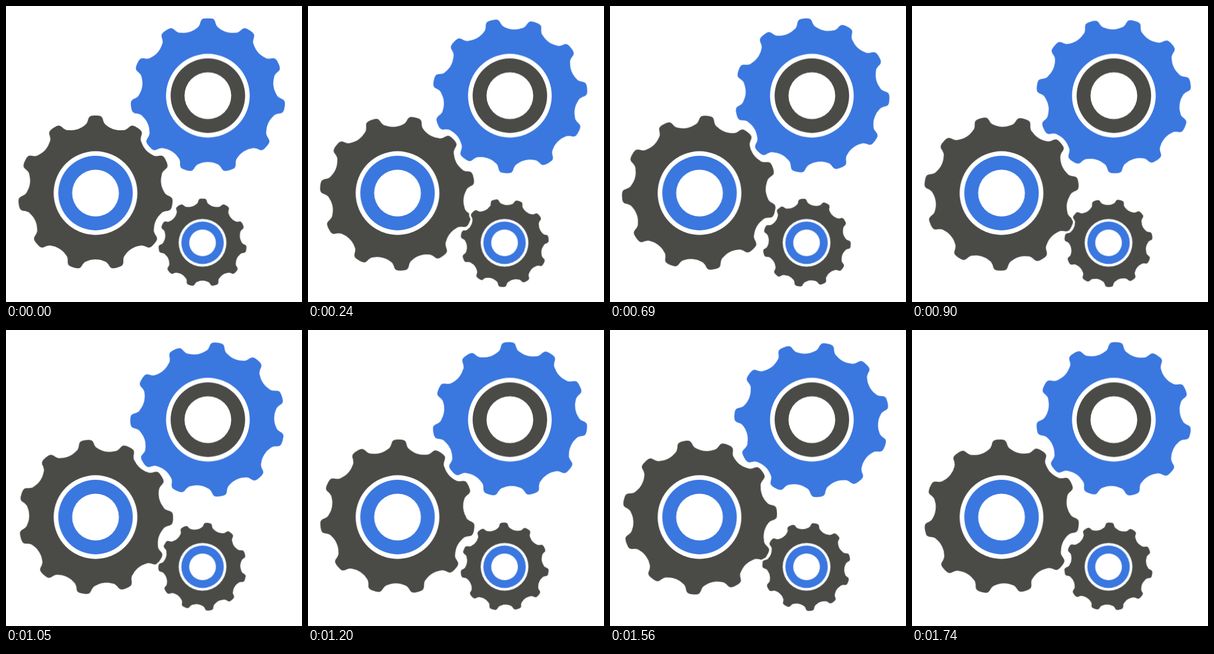
An HTML page that plays this animation: 500x500 px, repeating every 1770 ms.

```html
<!DOCTYPE html>
<html lang="en">
<head>
<meta charset="utf-8">
<title>Turning gears</title>
<style>
  html, body { margin: 0; width: 100%; height: 100%; overflow: hidden; background: #fff; }
  svg { display: block; width: 100vw; height: 100vh; }
  .blue { fill: #3a77df; }
  .dark { fill: #4a4a47; }
  .white { fill: #fff; }
  .wheel { animation: turn 1770ms steps(59) infinite; }
  .back { animation-direction: normal; animation-name: turn-back; }
  .edged { stroke: #fff; stroke-width: 11; stroke-linejoin: round; paint-order: stroke; }
  /* three of the eleven teeth pass in one loop */
  @keyframes turn { to { transform: rotate(98.1818deg); } }
  @keyframes turn-back { to { transform: rotate(-98.1818deg); } }
</style>
</head>
<body>
<svg viewBox="0 0 500 500">
  <defs>
    <path id="gear"/>
    <circle id="rim" r="70.7"/>
    <circle id="ring" r="62.9"/>
    <circle id="hole" r="39.5"/>
  </defs>
  <g transform="translate(151.2 316)">
    <use href="#gear" class="wheel dark"/>
    <use href="#rim" class="white"/>
    <use href="#ring" class="blue"/>
    <use href="#hole" class="white"/>
  </g>
  <g transform="translate(341 151.5)">
    <use href="#gear" class="wheel back blue"/>
    <use href="#rim" class="white"/>
    <use href="#ring" class="dark"/>
    <use href="#hole" class="white"/>
  </g>
  <g transform="translate(332 400) scale(.57)">
    <use href="#gear" class="wheel back dark edged"/>
    <use href="#rim" class="white"/>
    <use href="#ring" class="blue"/>
    <use href="#hole" class="white"/>
  </g>
</svg>
<script>
  const TEETH = 11;
  const PITCH = 360 / TEETH;

  // Half a tooth: degrees from its middle, radius
  const half = [
    [0, 131], [2.5, 130.8], [4.3, 129.5], [5.4, 126.5], [6.3, 122],
    [7.6, 118], [9.8, 115.3], [13, 112.8], [PITCH / 2, 112]
  ];
  const mirrored = half.slice(1, -1).reverse().map(([a, r]) => [-a, r]);
  const tooth = [...mirrored, ...half];

  const polar = (deg, r) => {
    const a = deg * Math.PI / 180;
    return [r * Math.sin(a), -r * Math.cos(a)];
  };

  // Closed Catmull-Rom curve as cubic Béziers
  function smooth(pts) {
    const at = i => pts[(i + pts.length) % pts.length];
    const fmt = p => p.map(v => v.toFixed(2)).join(" ");
    const handle = (p, from, to, k) => p.map((v, i) => v + (to[i] - from[i]) * k);
    const curves = pts.map((p, i) => {
      const next = at(i + 1);
      const c1 = handle(p, at(i - 1), next, 1 / 6);
      const c2 = handle(next, p, at(i + 2), -1 / 6);
      return `C${fmt(c1)} ${fmt(c2)} ${fmt(next)}`;
    });
    return `M${fmt(pts[0])}${curves.join("")}Z`;
  }

  const outline = [];
  for (let n = 0; n < TEETH; n++) {
    for (const [a, r] of tooth) outline.push(polar(a + n * PITCH, r));
  }
  document.getElementById("gear").setAttribute("d", smooth(outline));
</script>
</body>
</html>
```
